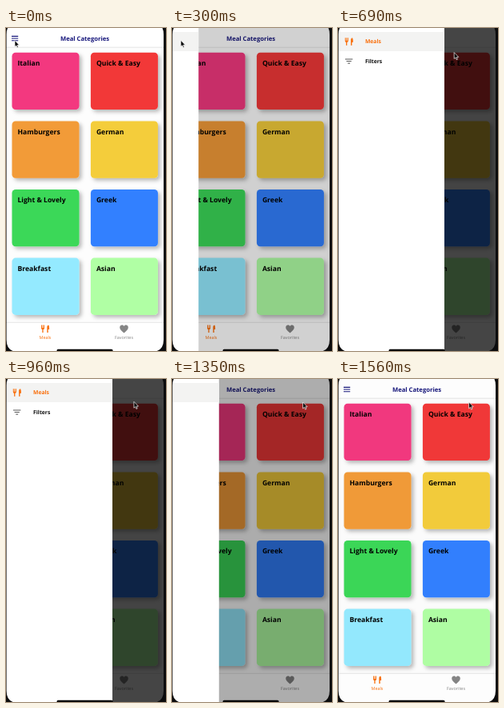
Write an HTML page that moves like this. It is 200x404 px and loops after 1.59 s.

```html
<!DOCTYPE html>
<html lang="en">
<head>
<meta charset="utf-8">
<title>Meal Categories</title>
<style>
  html, body { margin: 0; width: 100%; height: 100%; overflow: hidden; background: #fff; }
  svg { display: block; width: 200px; height: 404px; }
  text { font-family: "Open Sans", sans-serif; text-rendering: geometricPrecision; }
  .title { font-weight: 700; font-size: 7.65px; fill: #17177c; text-anchor: middle; }
  .card text { font-weight: 700; font-size: 8.6px; fill: #000; }
  .card rect { filter: url(#shadow); }
  .item { font-weight: 700; font-size: 6.8px; fill: #111; }
  .tab { font-size: 5.45px; text-anchor: middle; }
  .orange { fill: #f9700e; }
  .gray { fill: #858585; }
</style>
</head>
<body>
<svg viewBox="0 0 200 404">
  <defs>
    <filter id="shadow" x="-20%" y="-20%" width="150%" height="150%">
      <feDropShadow dx="3" dy="3" stdDeviation="2.6" flood-color="#000" flood-opacity=".27"/>
    </filter>
    <g id="utensils">
      <path d="M-5-4.7h.9v3.5h.7v-3.5h.9v3.5h.7v-3.5h.9v3.8q0 1.6-1.5 2v3.6h-1.3V1.1Q-5 .7-5-.9z"/>
      <path d="M2.3 4.7V-2.4Q2.4-4.3 4.4-4.7V.9H3.7V4.7z"/>
      <path d="M3.6-4.5q1.7.6 1.5 5.3H3.6z"/>
    </g>
  </defs>

  <rect width="200" height="404" fill="#fdfdfd"/>
  <g id="cards"></g>

  <rect width="200" height="24" fill="#fff"/>
  <path d="M0 24.2H200" stroke="#d6d6d6" stroke-width=".6"/>
  <path id="menu" d="M7 10.3h8.2M7 13h8.2M7 15.7h8.2" stroke="#17177c" stroke-width="1.15"/>
  <text class="title" x="98.5" y="15.8">Meal Categories</text>

  <rect y="368" width="200" height="36" fill="#fff"/>
  <path d="M0 368.3H200" stroke="#d3d3d3" stroke-width=".6"/>
  <use class="orange" href="#utensils" x="49" y="376.2"/>
  <text class="tab orange" x="49" y="389.2">Meals</text>
  <path class="gray" d="M147.5 381.4C144 378.4 142.2 376.8 142.2 374.5C142.2 371.4 145.9 370.6 147.5 373C149.1 370.6 152.8 371.4 152.8 374.5C152.8 376.8 151 378.4 147.5 381.4z"/>
  <text class="tab gray" x="147.5" y="389.2">Favorites</text>

  <rect id="dim" width="200" height="404" opacity="0"/>

  <g id="drawer">
    <rect x="-10" width="143" height="404" fill="#fff"/>
    <rect y="5" width="133" height="24" fill="#f3f3f2"/>
    <use class="orange" href="#utensils" x="13.8" y="17"/>
    <text class="item orange" x="34" y="19.4">Meals</text>
    <path d="M9 39h9.4M10.6 41.6h6.2M12.3 44.2h2.8" stroke="#4a4a4a" stroke-width=".95"/>
    <text class="item" x="34" y="44.1">Filters</text>
  </g>

  <rect x="63.5" y="401.7" width="70" height="4" rx="1.5"/>
  <path fill="#0c0c0d" fill-rule="evenodd" d="M0 0H200V404H0z M.6 8V390Q.6 405 15 405H182Q197 405 197 390V8Q197-7 182-7H15Q.6-7 .6 8z"/>

  <path id="cursor" d="M0 0V7.9L1.8 6.3L3 9.1L4.3 8.5L3.1 5.8H5.6z" fill="#000" stroke="#fff" stroke-width=".7" stroke-linejoin="round"/>
</svg>

<script>
  const LOOP = 1590, WIDTH = 133, DIM = 0.73;
  const OPEN = 260, CLOSE = 1271, RATE = 0.0234;

  const meals = [
    ["Italian", "#f3387f"], ["Quick & Easy", "#f23838"],
    ["Hamburgers", "#f29b38"], ["German", "#f4cd3a"],
    ["Light & Lovely", "#3bd858"], ["Greek", "#3080ff"],
    ["Breakfast", "#94eaff"], ["Asian", "#b0ffa4"]
  ];

  // time, x, y of the pointer tip
  const pointer = [
    [0, 11, 15.6], [560, 11, 15.2], [600, 45, 19], [630, 85, 24],
    [660, 122, 28.5], [690, 145, 30.6], [750, 154, 29.6], [900, 159, 28.5],
    [1080, 161.7, 28], [1230, 161.7, 28], [1290, 163.6, 29], [LOOP, 163.6, 29]
  ];

  const $ = id => document.getElementById(id);
  const clamp = v => Math.min(1, Math.max(0, v));

  function add(parent, tag, attrs) {
    const el = document.createElementNS("http://www.w3.org/2000/svg", tag);
    for (const key in attrs) el.setAttribute(key, attrs[key]);
    return parent.appendChild(el);
  }

  meals.forEach(([name, fill], i) => {
    const x = 7.5 + (i % 2) * 98.4, y = 30.8 + (i >> 1) * 85.6;
    const card = add($("cards"), "g", { class: "card" });
    add(card, "rect", { x, y, width: 84, height: 71.3, rx: 4.5, fill });
    add(card, "text", { x: x + 7, y: y + 16.4 }).textContent = name;
  });

  // critically damped spring from 0 to 1
  function spring(ms) {
    const k = RATE * Math.max(0, ms);
    return 1 - (1 + k) * Math.exp(-k);
  }

  function pointerAt(t) {
    const i = pointer.findIndex(p => p[0] > t);
    const [t0, x0, y0] = pointer[i - 1], [t1, x1, y1] = pointer[i];
    const k = (t - t0) / (t1 - t0);
    return [x0 + (x1 - x0) * k, y0 + (y1 - y0) * k];
  }

  function draw(t) {
    const shown = spring(t - OPEN) - spring(t - CLOSE);
    $("drawer").setAttribute("transform", `translate(${(shown - 1) * WIDTH} 0)`);
    $("dim").setAttribute("opacity", shown * DIM);
    const pressed = t < 700 ? clamp((t - 60) / 120) : 0;
    $("menu").setAttribute("opacity", 1 - 0.6 * pressed);
    $("cursor").setAttribute("transform", `translate(${pointerAt(t)})`);
  }

  const start = performance.now();
  function tick() {
    draw((performance.now() - start) % LOOP);
    requestAnimationFrame(tick);
  }
  tick();
</script>
</body>
</html>
```
